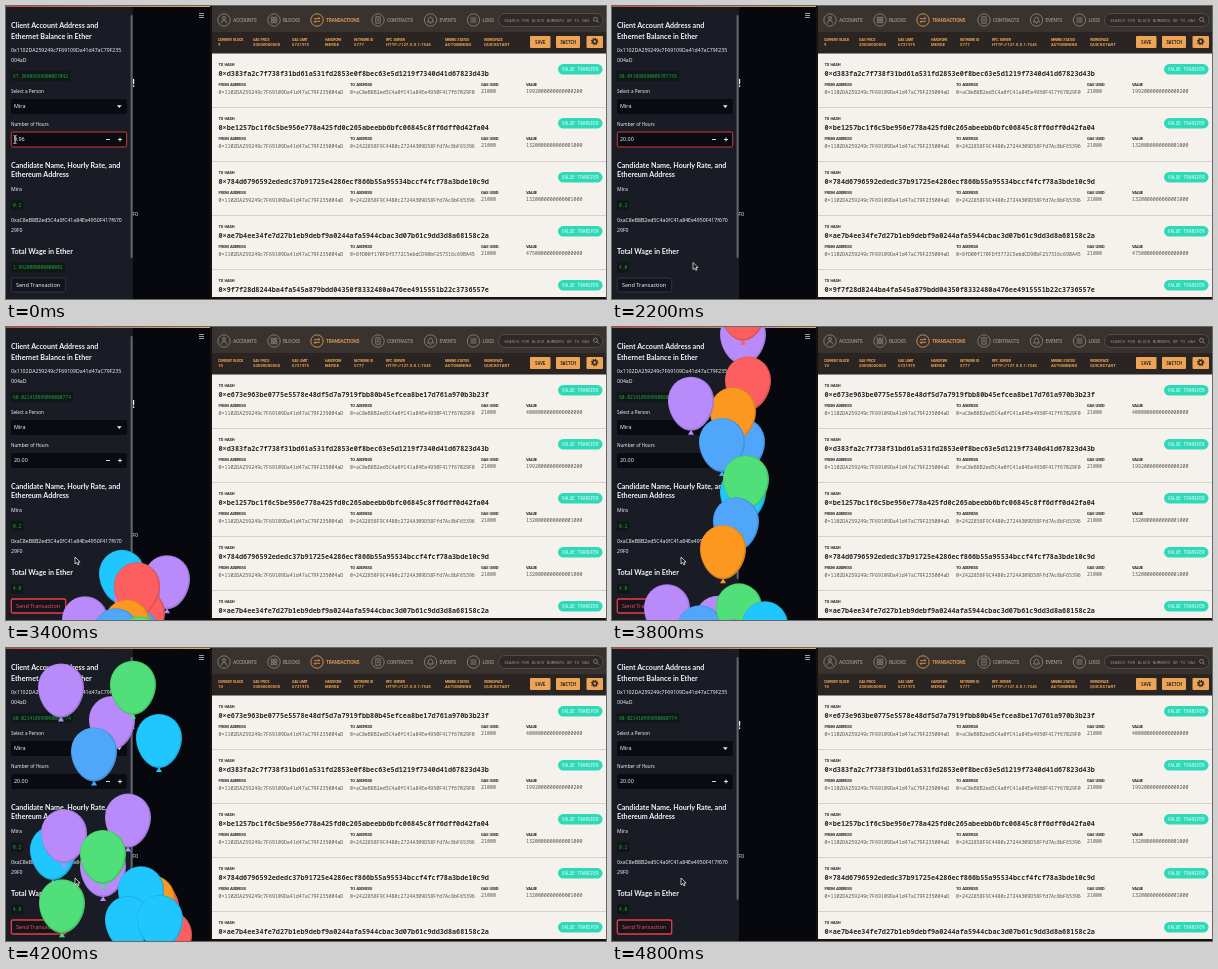
These frames come from a looping animation (600x293 px, 4900 ms). An HTML page:

```html
<!DOCTYPE html>
<html lang="en">
<head>
<meta charset="utf-8">
<title>Paying a candidate in Ether</title>
<style>
  html, body { margin: 0; width: 100%; height: 100%; overflow: hidden; background: #06080d; }
  svg { display: block; width: 100vw; height: 100vh; }
  text { font-family: "Noto Sans", "Open Sans", sans-serif; fill: #f2f3f5; white-space: pre; }
  .head { font-family: Lato, "Noto Sans", sans-serif; font-weight: 700; }
  .mono { font-family: "Noto Sans Mono", "DejaVu Sans Mono", monospace; }
  .strong { font-weight: 600; }
  .cap, .nav, .stat { font-family: Roboto, "Liberation Sans", sans-serif; font-weight: 600; }
  .cap { letter-spacing: -.08em; word-spacing: .2em; }
  .nav { font-weight: 500; letter-spacing: -.05em; }
  .stat { letter-spacing: .03em; }
  .ink { fill: #2c2826; }
  .dim { fill: #55504c; }
  .gray { fill: #9a9089; }
  .gold { fill: #eda456; }
  .green { fill: #1fa64c; }
  .icon { fill: none; stroke: #948a83; stroke-width: .8; }
  .icon.on { stroke: #eda456; }
</style>
</head>
<body>
<svg id="stage" viewBox="0 0 600 293" preserveAspectRatio="none"></svg>
<script>
const LOOP = 4900, STEP = 100;
const stage = document.getElementById('stage');

// y is the middle of the line of text
const text = (x, y, size, str, cls = '', attrs = '') =>
  `<text x="${x}" y="${(y + size * .36).toFixed(2)}" font-size="${size}" class="${cls}" ${attrs}>${str}</text>`;
const rect = (x, y, w, h, fill, attrs = '') =>
  `<rect x="${x}" y="${y}" width="${w}" height="${h}" fill="${fill}" ${attrs}/>`;
const path = (d, attrs) => `<path d="${d}" ${attrs}/>`;
const hex = s => '0×' + s;

// ---- left: the web app ----
const chip = (id, y) => rect(5, y - 5, 0, 10, '#101716', `id="${id}Box" rx="1.2"`) +
  text(7, y, 4.6, '', 'mono green', `id="${id}"`);

function app() {
  const heads = [[19.5, 'Client Account Address and'], [30, 'Ethernet Balance in Ether'],
    [159, 'Candidate Name, Hourly Rate, and'], [168.5, 'Ethereum Address'], [245.7, 'Total Wage in Ether']];
  const lines = [[44.3, '0x1102DA259249c7F69109Da41d47aC79F235'], [54.5, '004aD'], [182.7, 'Mira'],
    [214.3, '0xaC8eB8B2ed5C4a0fC41a84Ee4950F417f670'], [224, '29F0']];
  return rect(0, 0, 204, 293, '#06080d') +
    rect(0, 0, 127, 293, '#191c25') +
    text(126, 77, 11, '!', 'head') + text(126.3, 208, 5.3, 'F0') +
    rect(0, 0, 204, 1, 'url(#strip)') +
    rect(124.6, 9, 2, 243, '#62656c', 'rx="1"') +
    path('M193 7.5h5M193 9.5h5M193 11.5h5', 'stroke="#c4c5c9" stroke-width=".8"') +
    heads.map(([y, s]) => text(5, y, 7.15, s, 'head')).join('') +
    lines.map(([y, s]) => text(5, y, 5.17, s)).join('') +
    text(5, 85, 4.6, 'Select a Person') + text(5, 118.3, 4.6, 'Number of Hours') +
    rect(5, 93, 116, 15, '#090b11', 'rx="1.5"') + text(8, 100.3, 5.4, 'Mira') +
    path('M111 99.2h4.6l-2.3 2.8z', 'fill="#f2f3f5"') +
    rect(5.3, 126, 115.4, 15, '#090b11', 'id="field" rx="1.5" stroke-width=".9"') +
    text(8, 133.5, 5.4, '', '', 'id="hours"') +
    path('M100 133.5h4M112 133.5h4M114 131.5v4', 'stroke="#f2f3f5" stroke-width=".9"') +
    chip('balance', 70) + chip('rate', 199) + chip('wage', 261.5) +
    rect(5.3, 272, 54.4, 14, '#12151d', 'id="button" rx="1.6"') +
    text(10, 278.7, 5.5, 'Send Transaction', '', 'id="send"');
}

// ---- right: the chain explorer ----
const CLIENT = '1102DA259249c7F69109Da41d47aC79F235004aD';
const PAYEE = 'aC8eB8B2ed5C4a0fC41a84Ee4950F417f67029F0';
const OTHER = '2422858F9C4480c2724A309D58Ffd7Ac8bF65396';
const TXS = [
  ['e673e963be0775e5578e48df5d7a7919fbb80b45efcea8be17d761a970b3b23f', PAYEE, '4000000000000000000'],
  ['d383fa2c7f738f31bd61a531fd2853e0f8bec63e5d1219f7340d41d67823d43b', PAYEE, '1992000000000000200'],
  ['be1257bc1f6c5be956e778a425fd0c265abeebb6bfc06845c8ff6dff0d42fa04', OTHER, '1320000000000001000'],
  ['784d6796592ededc37b91725e4286ecf866b55a95534bccf4fcf78a3bde10c9d', OTHER, '1320000000000001000'],
  ['ae7b4ee34fe7d27b1eb9debf9a0244afa5944cbac3d07b61c9dd3d8a68158c2a',
    '8fD00f170FDf3772C5ebdCD90bF257316c69BA45', '4750000000000000000'],
  ['9f7f28d8244ba4fa545a879bdd04350f8332480a476ee4915551b22c3736557e', PAYEE, '1000000000000000000'],
];
const PITCH = 54;

function txRow([hash, to, value], i) {
  const y = 47 + i * PITCH;
  const cell = (x, label, val, lift = 0) =>
    text(x, y + 32 - lift, 4.1, label, 'cap ink') + text(x, y + 39.4 - lift, 4.96, val, 'mono dim');
  return text(212.5, y + 11.8, 4.1, 'TX HASH', 'cap ink') +
    text(212.5, y + 21, 6.83, hex(hash), 'mono strong ink') +
    cell(212.5, 'FROM ADDRESS', hex(CLIENT)) + cell(344, 'TO ADDRESS', hex(to)) +
    cell(475, 'GAS USED', '21000', .7) + cell(520, 'VALUE', value, .7) +
    rect(552, y + 11, 44.5, 10.6, '#2fd9b8', 'rx="5.3"') +
    text(574.2, y + 16.3, 4.4, 'VALUE TRANSFER', 'mono', 'text-anchor="middle" style="fill:#eefffa"') +
    rect(206, y + 54.2, 394, .8, '#cfcac4');
}

const GLYPHS = {
  person: 'M-2.8 3.4C-2.8-.4 2.8-.4 2.8 3.4M-1.5-2a1.5 1.5 0 1 0 3 0a1.5 1.5 0 1 0-3 0',
  grid: 'M-2.8-2.8h2.2v2.2h-2.2zM.6-2.8h2.2v2.2h-2.2zM-2.8.6h2.2v2.2h-2.2zM.6.6h2.2v2.2h-2.2z',
  swap: 'M-3-1.3h6l-1.7-1.7M3 1.3h-6l1.7 1.7',
  page: 'M-2.2-3.2h4.4v6.4h-4.4zM-1-1.2h2M-1 .6h2',
  bell: 'M-3 2h6C1.8 1 2.6-3 0-3S-1.8 1-3 2M-.7 3.3h1.4',
  list: 'M-3-2h6M-3 0h6M-3 2h6',
};
const NAV = [[218, 'ACCOUNTS', 'person'], [268, 'BLOCKS', 'grid'], [311, 'TRANSACTIONS', 'swap'],
  [372, 'CONTRACTS', 'page'], [424.5, 'EVENTS', 'bell'], [467.5, 'LOGS', 'list']];
const STATUS = [[212, 'CURRENT BLOCK', ''], [247, 'GAS PRICE', '20000000000'], [286, 'GAS LIMIT', '6721975'],
  [319, 'HARDFORK', 'MERGE'], [348, 'NETWORK ID', '5777'], [380, 'RPC SERVER', 'HTTP://127.0.0.1:7545'],
  [439, 'MINING STATUS', 'AUTOMINING'], [478, 'WORKSPACE', 'QUICKSTART']];

function explorer() {
  const nav = NAV.map(([x, label, glyph]) => {
    const on = glyph == 'swap';
    return `<g class="icon ${on ? 'on' : ''}" transform="translate(${x} 14)"><circle r="6.2"/>${path(GLYPHS[glyph], '')}</g>` +
      text(x + 9, 14, 4.9, label, 'nav ' + (on ? 'gold' : 'gray'));
  });
  const status = STATUS.map(([x, label, val], i) =>
    text(x, 33.5, 3.6, label, 'cap gold') + text(x, 38.3, 4.1, val, 'stat gold', i ? '' : 'id="block"'));
  const button = (x, w, label) => rect(x, 30, w, 12, '#eda456', 'rx="1"') +
    text(x + w / 2, 36, 4.3, label, 'mono strong ink', 'text-anchor="middle"');
  return rect(204, 0, 396, 293, '#17110e') + rect(206, 47, 394, 244, '#f5f2ed') +
    '<g id="rows" clip-path="url(#list)"></g>' +
    rect(206, 0, 394, 26, '#38332f') + rect(206, 26, 394, 21.5, '#2a2522') +
    nav.join('') + status.join('') +
    rect(492.5, 7.5, 104.5, 13, '#2e2926', 'rx="6.5" stroke="#5b544f" stroke-width=".8"') +
    text(498, 14, 4.2, 'SEARCH FOR BLOCK NUMBERS OR TX HAS', 'mono gray') +
    '<g class="icon"><circle cx="589.5" cy="13.3" r="2"/><path d="M591 14.8l2 2"/></g>' +
    button(524, 20.5, 'SAVE') + button(550, 24, 'SWITCH') + button(580.5, 16.5, '') +
    '<g fill="none" stroke="#2c2826"><circle cx="588.7" cy="35.5" r="2" stroke-width="1.5"/>' +
    '<circle cx="588.7" cy="35.5" r="3.2" stroke-width="1.1" stroke-dasharray="1.25"/></g>';
}

// ---- balloons: x, launch time, colour; back to front ----
const HUES = { c: '#20c7ff', b: '#50a6fb', p: '#b98bfa', r: '#fd5f60', o: '#fc981f', g: '#50df78' };
const BALLOONS = [
  [116, 3079, 'c'], [161, 3091, 'p'], [131, 3133, 'p'], [136, 3184, 'r'], [131, 3108, 'r'], [130, 3260, 'b'],
  [121, 3221, 'o'], [79, 3208, 'p'], [131, 3331, 'c'], [110, 3260, 'b'], [134, 3312, 'g'], [124, 3378, 'b'],
  [111, 3428, 'o'], [55, 3568, 'p'], [106, 3606, 'p'], [88, 3645, 'b'], [127, 3565, 'g'], [153, 3628, 'c'],
  [47, 3791, 'c'], [58, 3763, 'p'], [97, 3822, 'p'], [122, 3738, 'p'], [97, 3798, 'g'], [56, 3898, 'g'],
  [163, 3986, 'r'], [150, 3907, 'r'], [146, 3889, 'o'], [135, 3869, 'c'], [122, 3941, 'c'], [154, 3938, 'c'],
];
const EGG = 'M0 27C-12.5 27-23 11-23-3.5A23 23.5 0 0 1 23-3.5C23 11 12.5 27 0 27z';
const balloon = ([, , hue]) => `<g fill="${HUES[hue]}">` +
  path('M0 26l3 5h-6z', '') + path(EGG, '') + path(EGG, 'fill="#000" fill-opacity=".13"') +
  path(EGG, 'transform="translate(-.5 -.5) scale(.955)"') + '</g>';
const rise = age => 322 - .0007 * age * age;

stage.innerHTML = '<clipPath id="list"><path d="M206 47h394v244h-394z"/></clipPath>' +
  '<clipPath id="page"><path d="M0 0h204v293h-204z"/></clipPath>' +
  '<linearGradient id="strip"><stop stop-color="#d0453c"/><stop offset="1" stop-color="#d3b65a"/></linearGradient>' +
  app() + explorer() +
  `<g id="balloons" clip-path="url(#page)">${BALLOONS.map(balloon).join('')}</g>` +
  path('M-1.5-4q1.5 0 1.5 1v6q0 1-1.5 1M1.5-4q-1.5 0-1.5 1M0 3q0 1 1.5 1',
    'id="beam" fill="none" stroke="#fff" stroke-width=".8" transform="translate(9 133.5)"') +
  path('M-2-3.5v7l1.7-1.5 1.1 2.4 1.2-.6-1.1-2.3h2.2z', 'id="arrow" fill="#111" stroke="#fff" stroke-width=".7"');

const el = id => document.getElementById(id);
const set = (id, attrs) => { for (const k in attrs) el(id).setAttribute(k, attrs[k]); };
const show = (id, on) => { el(id).style.display = on ? '' : 'none'; };
function write(id, str) { if (el(id).textContent != str) el(id).textContent = str; }
function writeChip(id, str) {
  write(id, str);
  set(id + 'Box', { width: 4 + str.length * 2.76 });
}

// the latest value whose start time has passed
const at = (t, steps) => steps.filter(([start]) => t >= start).pop()[1];

const TRAIL = [[1800, 60, 190], [2200, 83, 260], [2600, 36, 280], [2900, 36, 280], [3300, 71, 233.5]];
function pointer(t) {
  const i = TRAIL.findIndex(p => p[0] > t);
  if (i < 0) return TRAIL.at(-1).slice(1);
  if (!i) return TRAIL[0].slice(1);
  const [a, b] = [TRAIL[i - 1], TRAIL[i]], u = (t - a[0]) / (b[0] - a[0]), k = u * u * (3 - 2 * u);
  return [1, 2].map(j => a[j] + (b[j] - a[j]) * k);
}

let shown;
function draw(t) {
  const sent = t >= 2900, mined = t >= 3100;
  write('hours', at(t, [[0, '9.96'], [1000, '2|'], [1100, '20|'], [1200, '20.|'], [1300, '20.0|'], [1400, '20.00|'], [1600, '20.00']]));
  writeChip('balance', at(t, [[0, '67.38409999900067042'], [1800, '60.041090990006707745'], [3200, '60.021410999090080774']]));
  writeChip('rate', '0.2');
  writeChip('wage', t < 1800 ? '1.9920000000000002' : '4.0');
  set('field', { stroke: sent ? 'none' : '#e2403f' });
  set('button', { stroke: sent ? '#ef3b3f' : '#454851', 'stroke-width': sent ? 1.3 : .6 });
  el('send').style.fill = sent ? '#ff4b4b' : '';

  write('block', mined ? '10' : '9');
  if (shown !== mined) {
    el('rows').innerHTML = TXS.slice(mined ? 0 : 1).map(txRow).join('');
    shown = mined;
  }

  BALLOONS.forEach(([x, start], i) => {
    const age = t - start, g = el('balloons').children[i];
    g.style.display = age > 0 && age < 750 ? '' : 'none';
    g.setAttribute('transform', `translate(${x} ${rise(age).toFixed(2)})`);
  });

  show('beam', t < 900);
  show('arrow', t >= 1800);
  set('arrow', { transform: `translate(${pointer(t)})` });
}

const begin = performance.now();
function tick() {
  const t = (performance.now() - begin) % LOOP;
  draw(Math.floor(t / STEP) * STEP);
  requestAnimationFrame(tick);
}
tick();
</script>
</body>
</html>
```
